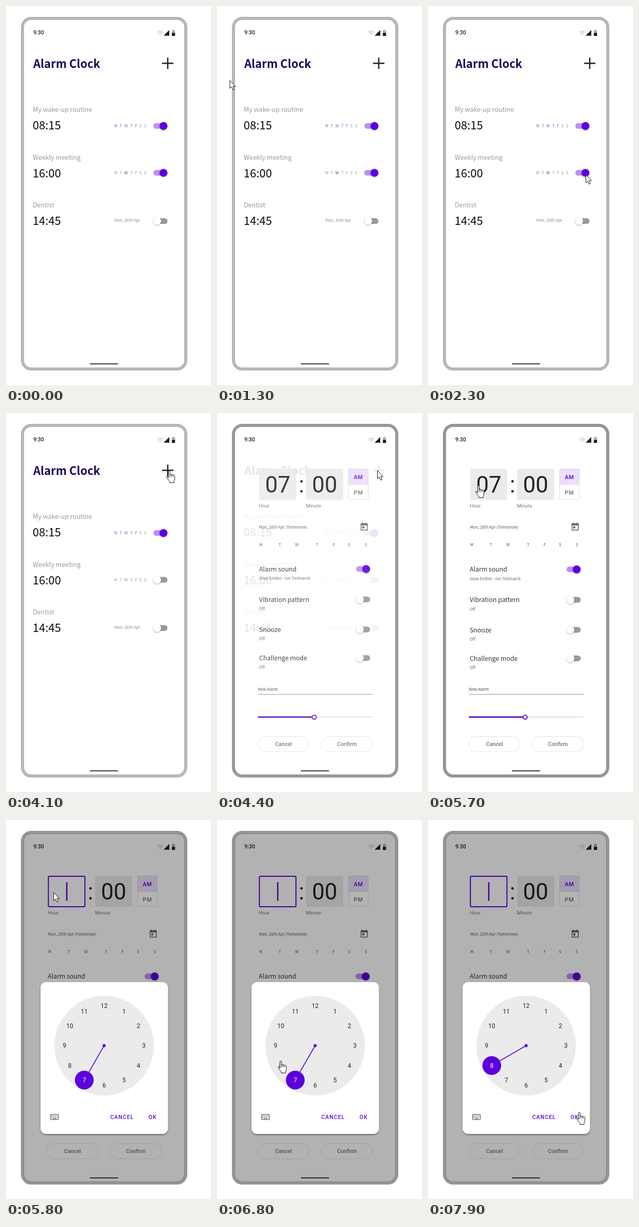
An HTML page that plays this animation: 398x734 px, repeating every 8000 ms.

```html
<!DOCTYPE html>
<html lang="en">
<head>
<meta charset="utf-8">
<title>Alarm clock</title>
<style>
html, body { margin: 0; width: 100%; height: 100%; overflow: hidden; background: #fff; }
svg { display: block; width: 100vw; height: 100vh; }
text { font-family: "Noto Sans CJK JP", "Noto Sans CJK SC", "Noto Sans CJK", "Noto Sans", sans-serif; }
.r { font-family: Roboto, sans-serif; }
.m { font-weight: 500; }
.c { text-anchor: middle; }
</style>
</head>
<body>
<svg id="stage" viewBox="0 0 398 734"></svg>
<script>
const PURPLE = '#5c00dc', GRAY = '#999';
const LOOP = 8000, FADE = 4200, DIALOG = 5750, PICK = 6950;

const text = (x, y, size, color, str, cls = '', extra = '') =>
  `<text x="${x}" y="${y}" font-size="${size}" fill="${color}" class="${cls}" ${extra}>${str}</text>`;
const rect = (x, y, w, h, r, fill, extra = '') =>
  `<rect x="${x}" y="${y}" width="${w}" height="${h}" rx="${r}" fill="${fill}" ${extra}/>`;
const line = (x1, y1, x2, y2, color, width) =>
  `<path d="M${x1} ${y1}L${x2} ${y2}" stroke="${color}" stroke-width="${width}"/>`;

const toggle = (x, y, on, id = '') => `<g id="${id}" transform="translate(${x} ${y})">
  ${rect(0, -5.5, 27.5, 11, 5.5, on ? '#bb91ee' : GRAY)}
  <circle cx="${on ? 19.7 : 7.5}" r="7.6" fill="${on ? PURPLE : '#fff'}" filter="url(#soft)"/></g>`;

const days = (xs, y, colorAt, cls) => [...'MTWTFSS'].map((d, i) =>
  text(xs[i], y, 7.5, colorAt(i), d, 'c ' + cls, i == 2 ? 'data-mid="1"' : '')).join('');

const alarm = (name, time, y) =>
  text(52, y, 12.5, GRAY, name) + text(51.8, y + 34, 22, '#0a0a0a', time, 'm');

const option = (name, note, y, on) => text(81, y, 12.3, '#333', name, 'm')
  + text(81, y + 16.2, 7.8, '#666', note) + toggle(269, y - 4.5, on);

const button = (x, label) =>
  rect(x, 626.5, 99.5, 29.5, 14.7, '#fff', 'stroke="#e2e2e2"')
  + text(x + 49.7, 645, 10.7, '#757575', label, 'r m c');

const dayX = [213, 223, 233, 243.5, 252.5, 261, 270];
const wideX = [85, 122, 155, 194.5, 226.5, 256.5, 289];

const listScreen = `<g id="list">
  ${text(53, 120, 22, '#21005d', 'Alarm Clock', '', 'font-weight="700"')}
  ${line(303, 111, 325, 111, '#222', 2.6)}${line(314, 100, 314, 122, '#222', 2.6)}
  ${alarm('My wake-up routine', '08:15', 205)}
  ${alarm('Weekly meeting', '16:00', 298)}
  ${alarm('Dentist', '14:45', 389.5)}
  ${days(dayX, 235.3, i => i < 5 ? '#7a62b8' : GRAY, '')}
  <g id="meetingDays">${days(dayX, 326.3, () => '#909090', '')}</g>
  ${text(210, 418, 7.8, '#8c8c8c', 'Mon, 26th Apr')}
  ${toggle(286, 232.3, true)}${toggle(286, 323, true, 'meeting')}${toggle(286, 416.5, false)}
</g>`;

const editScreen = `<g id="edit">
  <g id="hourText">${rect(82, 108, 72, 60, 2, '#ebebeb')}${text(118, 153.5, 43.5, '#222', '07', 'r c')}</g>
  <g id="hourInput">${rect(82.3, 109, 71, 59, 2, '#fff', `stroke="${PURPLE}" stroke-width="2"`)}
    ${rect(116.7, 120.5, 2.6, 36, 0, PURPLE)}</g>
  ${text(164, 153.5, 43.5, '#222', ':', 'r c')}
  ${rect(173, 108, 72, 60, 2, '#ebebeb')}${text(209, 153.5, 43.5, '#222', '00', 'r c')}
  ${rect(255.5, 108.5, 38, 59, 1, '#fff', 'stroke="#dedede"')}
  ${rect(255.5, 108.5, 38, 29.5, 1, '#eddffb', 'stroke="#dccdee"')}
  ${text(274.5, 127.7, 11, PURPLE, 'AM', 'r m c', 'letter-spacing=".6"')}
  ${text(274.5, 157.7, 11, '#707070', 'PM', 'r m c', 'letter-spacing=".6"')}
  ${text(81.5, 182.5, 9.5, '#777', 'Hour', 'r')}${text(172.7, 182.5, 9.5, '#777', 'Minute', 'r')}
  ${text(81.5, 223.7, 7.7, '#555', 'Mon, 26th Apr (Tomorrow)', 'm')}
  <path d="M279.7 214.5h12v12.2h-12zM282.5 212v3M289 212v3" fill="none" stroke="#616161" stroke-width="1.5"/>
  ${rect(279, 214, 13.4, 3.6, 0, '#616161')}${rect(282, 219.5, 4, 4, 0, '#616161')}
  ${days(wideX, 257.7, () => '#4c4c4c', 'm')}
  <g id="options">
    ${option('Alarm sound', 'Slow Ember - Ivo Trelmarck', 307.3, true)}
    ${option('Vibration pattern', 'Off', 366.3)}
    ${option('Snooze', 'Off', 424.5)}
    ${option('Challenge mode', 'Off', 479.7)}
  </g>
  ${text(79.5, 538, 7.6, '#444', 'New Alarm', 'm')}
  ${line(79.5, 545, 302, 545, '#8a8a8a', 1)}
  ${line(188, 588.7, 302, 588.7, '#d6c3ee', 1.2)}${line(79.5, 588.9, 188, 588.9, '#5800c4', 2.7)}
  <circle cx="188.7" cy="589.2" r="4" fill="#fff" stroke="#5800c4" stroke-width="1.8"/>
  ${button(79.5, 'Cancel')}${button(202.5, 'Confirm')}
</g>`;

const statusBar = text(53, 54.7, 10.6, '#222', '9:30', 'r m')
  + `<path d="M293 49.5Q299.5 44.5 306 49.5L299.5 57.5Z" fill="#e4e4e4"/>
  <path d="M306 57.5H317V46.5Z" fill="#1c1c1c"/>`
  + rect(323.5, 46, 3, 2, 0, '#b0b0b0') + rect(322, 47.3, 6.2, 5, 0, '#b0b0b0') + rect(322, 52, 6.2, 6, .6, '#1c1c1c')
  + line(163, 693.2, 217.5, 693.2, '#222', 1.7);

const keys = [572.5, 575].map(y => [0, 1, 2, 3, 4].map(i =>
  rect(88.3 + i * 2.4, y, 1.3, 1.3, 0, '#555')).join('')).join('');

const dialog = `<g id="dialog">
  ${rect(34.5, 26.5, 312, 674, 14, '#000', 'opacity=".3"')}
  ${rect(67, 314, 247.5, 294, 11, '#fff', 'filter="url(#lift)"')}
  <circle cx="190.5" cy="437" r="96.5" fill="#ebebeb"/>
  <g id="hand" fill="${PURPLE}">${line(190.5, 437, 190.5, 360, PURPLE, 1.6)}
    <circle cx="190.5" cy="437" r="3"/><circle cx="190.5" cy="360" r="18.2"/></g>
  <g id="numbers"></g>
  ${rect(86.7, 570.3, 14.8, 9.8, 1, 'none', 'stroke="#555" stroke-width="1.3"')}${keys}
  ${line(91, 578, 97.5, 578, '#555', 1.2)}
  ${text(202.5, 578.9, 10.5, PURPLE, 'CANCEL', 'r m', 'letter-spacing="1"')}
  ${text(276.7, 578.9, 10.5, PURPLE, 'OK', 'r m', 'letter-spacing="1"')}
</g>`;

const pointer = `<g id="pointer" fill="#fff" stroke="#111" stroke-linejoin="round">
  <path id="arrow" d="M.5 .6V16.2L4 13l2.7 6 2.6-1.2-2.6-5.6H11.4Z"/>
  <g id="finger"><path d="M4.3 14.5V2.2Q4.3 .6 5.8 .6T7.3 2.2V9Q7.5 7.5 8.9 7.6T10.4 9Q10.7 8 12 8.2T13.4 9.8Q13.8 9 15.2 9.4T16.6 11.3V17Q16.4 19.5 15 21V24H7V21.8Q4.8 19.8 3.2 17L.7 13.2Q.2 11.8 1.6 11.4T4.3 14.5Z"/>
  <path d="M7.3 9v4M10.4 9v4M13.4 10v3" fill="none" stroke-width=".9"/></g>
</g>`;

const $ = id => document.getElementById(id);
$('stage').innerHTML = `<defs>
  <filter id="soft" x="-50%" y="-50%" width="200%" height="200%"><feDropShadow dx="0" dy=".8" stdDeviation=".8" flood-opacity=".45"/></filter>
  <filter id="lift" x="-10%" y="-10%" width="120%" height="120%"><feDropShadow dx="0" dy="2" stdDeviation="1.6" flood-opacity=".4"/></filter>
  </defs>${rect(32, 24, 317, 679, 17, '#fff', 'id="frame" stroke-width="6"')}
  ${listScreen}${editScreen}${statusBar}${dialog}${pointer}`;

const ramp = (t, a, b) => Math.min(1, Math.max(0, (t - a) / (b - a)));
const smooth = p => p * p * (3 - 2 * p);
const show = (id, on) => $(id).setAttribute('visibility', on ? 'visible' : 'hidden');
const mix = (a, b, p) => `rgb(${a.map((v, i) => Math.round(v + (b[i] - v) * p))})`;

// pointer stops: time, x, y
const stops = [
  [1200, 7, 130], [1350, 33, 150], [1600, 236, 250], [1700, 260, 290], [1800, 301, 325], [2000, 306, 326],
  [3000, 306, 326], [3550, 311, 111], [4600, 311, 111], [5300, 92, 140],
  [6200, 92, 140], [6300, 117, 168], [6750, 118, 466], [7200, 118, 466], [7700, 288, 565.5], [8000, 288, 565.5]
];
const clicks = [[2400, 3050], [3500, 4250], [5400, DIALOG], [6750, 7250], [7650, 8000]];

function pointerAt(t) {
  const i = Math.max(1, stops.findIndex(s => s[0] > t));
  const [a, b] = [stops[i - 1], stops[i]];
  let p = ramp(t, a[0], b[0]);
  if (t > 3000 && t < 5300 || t > 7000) p = smooth(p);
  return [a[1] + (b[1] - a[1]) * p, a[2] + (b[2] - a[2]) * p];
}

let shownHour;
function setHour(hour) {
  if (hour === shownHour) return;
  shownHour = hour;
  $('hand').setAttribute('transform', `rotate(${hour * 30} 190.5 437)`);
  $('numbers').innerHTML = Array.from({ length: 12 }, (_, i) => {
    const n = i + 1, a = n * Math.PI / 6;
    return text(190.5 + 77 * Math.sin(a), 441.3 - 77 * Math.cos(a), 12, n == hour ? '#fff' : '#222', n, 'r c');
  }).join('');
}

const [track, knob] = $('meeting').children;
const midDay = $('meetingDays').querySelector('[data-mid]');

function draw(now) {
  const t = now % LOOP;

  const off = smooth(ramp(t, 2600, 2800));
  knob.setAttribute('cx', 19.7 - 12.2 * off);
  knob.setAttribute('fill', mix([92, 0, 220], [255, 255, 255], off));
  track.setAttribute('fill', mix([187, 145, 238], [153, 153, 153], off));
  midDay.setAttribute('fill', mix([92, 50, 180], [144, 144, 144], off));

  const p = 1 - (1 - ramp(t, FADE, FADE + 300)) ** 2;
  $('list').setAttribute('opacity', 1 - p);
  $('edit').setAttribute('opacity', p);
  $('options').setAttribute('transform', `translate(${8 * (1 - p)} ${-7 * (1 - p)})`);
  $('frame').setAttribute('stroke', mix([183, 183, 183], [149, 149, 149], p));

  const open = t >= DIALOG;
  show('dialog', open);
  show('hourInput', open);
  show('hourText', !open);
  setHour(t < PICK ? 7 : 8);

  const [x, y] = pointerAt(t);
  const seen = t >= stops[0][0], hand = clicks.some(([a, b]) => t >= a && t < b);
  $('pointer').setAttribute('transform', `translate(${x} ${y})`);
  show('arrow', seen && !hand);
  show('finger', seen && hand);
}

const start = performance.now();
(function tick() {
  draw(performance.now() - start);
  requestAnimationFrame(tick);
})();
</script>
</body>
</html>
```
